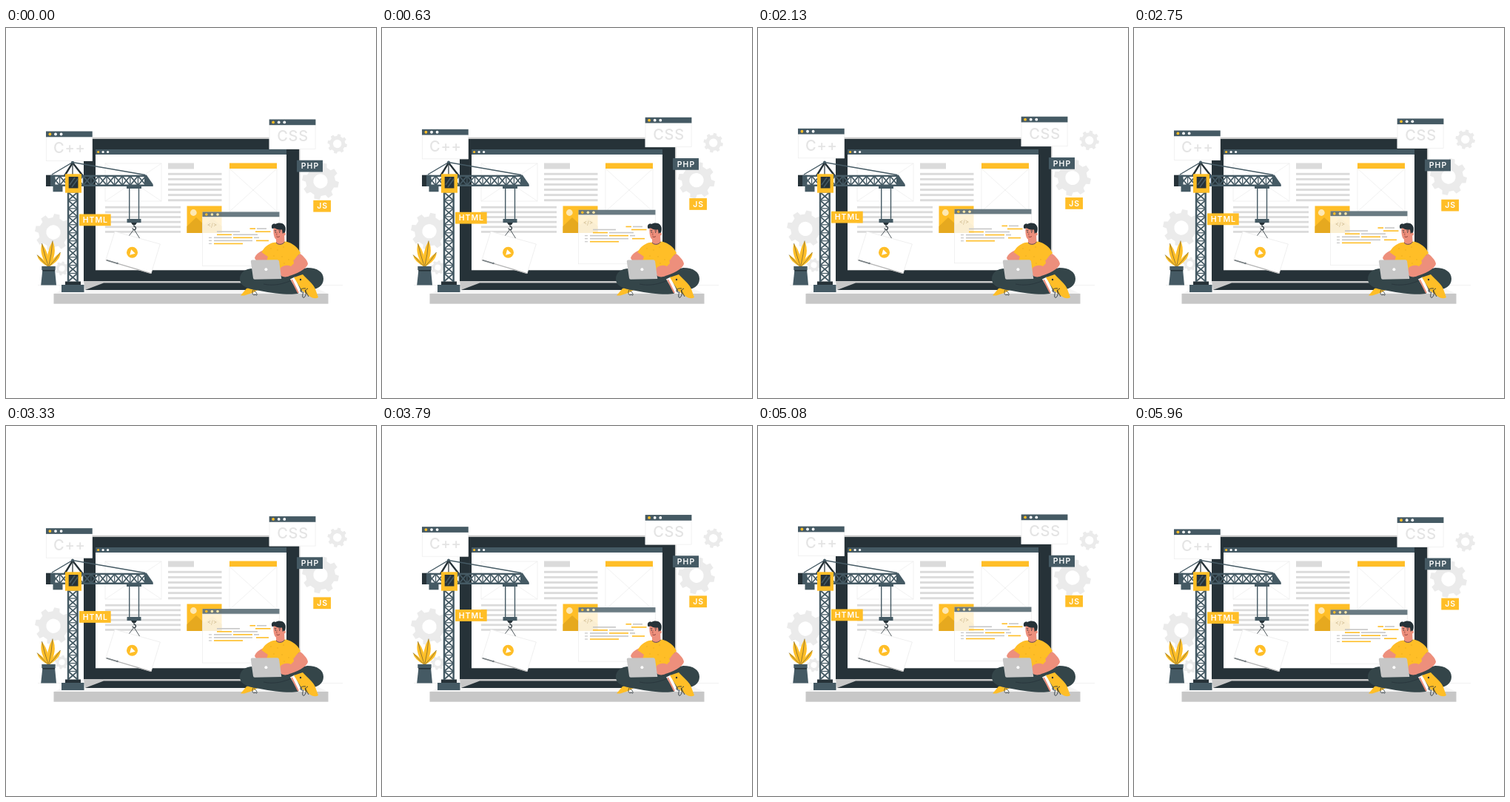
Animation, 500 px wide and 500 px high, one loop 6 s. Source, as an HTML page with a canvas:

```html
<!DOCTYPE html>
<html lang="en">
<head>
<meta charset="utf-8">
<title>Website under construction</title>
<style>
html, body { margin: 0; width: 100%; height: 100%; overflow: hidden; background: #fff; }
canvas { display: block; width: 500px; height: 500px; }
</style>
</head>
<body>
<canvas id="stage"></canvas>
<script>
const canvas = document.getElementById('stage');
const ratio = window.devicePixelRatio || 1;
canvas.width = canvas.height = 500 * ratio;
const ctx = canvas.getContext('2d');

const DARK = '#263238', SLATE = '#455a64', YELLOW = '#ffbe27', GOLD = '#e6a91f';
const PALE = '#ebebeb', LIGHT = '#dbdbdb', GREY = '#c7c7c7', SKIN = '#ed8f7c', PANTS = '#344549';
const LOOP = 6000, LIFT = 6.5;

function rect(color, x1, y1, x2, y2) {
  ctx.fillStyle = color;
  ctx.fillRect(x1, y1, x2 - x1, y2 - y1);
}
function frame(color, x1, y1, x2, y2, w = 0.7) {
  ctx.strokeStyle = color;
  ctx.lineWidth = w;
  ctx.strokeRect(x1, y1, x2 - x1, y2 - y1);
}
function dot(color, x, y, r) {
  ctx.fillStyle = color;
  ctx.beginPath();
  ctx.arc(x, y, r, 0, Math.PI * 2);
  ctx.fill();
}
function trace(pts) {
  ctx.beginPath();
  for (let i = 0; i < pts.length; i += 2) ctx.lineTo(pts[i], pts[i + 1]);
}
function poly(color, ...pts) {
  ctx.fillStyle = color;
  trace(pts);
  ctx.fill();
}
function line(color, w, ...pts) {
  ctx.strokeStyle = color;
  ctx.lineWidth = w;
  trace(pts);
  ctx.stroke();
}
function shape(color, d) {
  ctx.fillStyle = color;
  ctx.fill(new Path2D(d));
}
function curve(color, w, d) {
  ctx.strokeStyle = color;
  ctx.lineWidth = w;
  ctx.stroke(new Path2D(d));
}
function label(text, x, y, size, weight, color, gap) {
  ctx.font = `${weight} ${size}px Inter, sans-serif`;
  ctx.letterSpacing = gap + 'px';
  ctx.textAlign = 'center';
  ctx.textBaseline = 'alphabetic';
  ctx.fillStyle = color;
  ctx.fillText(text, x + gap / 2, y);
}
function crossBox(x1, y1, x2, y2) {
  frame(PALE, x1, y1, x2, y2);
  line(PALE, 0.7, x1, y1, x2, y2);
  line(PALE, 0.7, x1, y2, x2, y1);
}
function dots(x, y, step, r, rest = '#fff') {
  for (let i = 0; i < 3; i++) dot(i ? rest : YELLOW, x + i * step, y, r);
}

function gear(x, y, r, hole) {
  const teeth = 8, step = Math.PI * 2 / teeth;
  ctx.save();
  ctx.translate(x, y);
  ctx.rotate(0.2);
  ctx.beginPath();
  for (let i = 0; i < teeth; i++) {
    const edge = [[-0.3, 0.8], [-0.19, 1], [0.19, 1], [0.3, 0.8]];
    for (const [a, k] of edge) {
      const t = (i + a) * step;
      ctx.lineTo(Math.cos(t) * r * k, Math.sin(t) * r * k);
    }
  }
  ctx.closePath();
  ctx.moveTo(hole, 0);
  ctx.arc(0, 0, hole, 0, Math.PI * 2, true);
  ctx.fillStyle = PALE;
  ctx.fill('evenodd');
  ctx.restore();
}

function laptop() {
  rect(PALE, 43, 347.2, 455, 347.9);
  poly('#f5f5f5', 64.5, 359, 105, 342, 398, 342, 435.5, 359);
  poly(GREY, 105, 342, 397.5, 342, 397.5, 354, 107, 354);
  rect(GREY, 64.5, 359, 435.5, 372.7);
  poly(DARK, 107, 354, 132, 344.5, 370, 344.5, 395, 354);
  rect(GREY, 107, 147.8, 397.5, 342);
  rect(DARK, 105, 150, 396, 342);
  rect('#fff', 121, 164, 379, 327.3);
  rect(SLATE, 121, 164, 379, 171);
  dots(124.6, 167.5, 6.5, 1.6);
}

function page() {
  crossBox(134, 183, 210, 234);
  rect(LIGHT, 219, 182.5, 254, 190.5);
  for (let i = 0; i < 6; i++) {
    rect(LIGHT, 219, 195.8 + i * 7.1, 291.5, 198.7 + i * 7.1);
    rect(LIGHT, 134, 240.8 + i * 6.65, 236, 243.6 + i * 6.65);
  }
  crossBox(302, 190, 366, 248);
  rect(YELLOW, 302, 182.5, 366, 190);
  rect(YELLOW, 244.5, 240.5, 291.5, 277);
  poly(GOLD, 244.5, 277, 244.5, 268, 257, 256, 268, 266, 279, 257, 291.5, 268, 291.5, 277);
  dot('#fde8b3', 253.3, 249.5, 4.4);
}

function codeWindow(dy) {
  ctx.save();
  ctx.translate(0, dy);
  ctx.globalAlpha = 0.8;
  rect('#fff', 265.5, 248.5, 369.5, 321.5);
  rect(SLATE, 265.5, 248.5, 369.5, 255.5);
  ctx.globalAlpha = 1;
  frame(PALE, 265.5, 255.5, 369.5, 321.5);
  dots(270.8, 252, 7.6, 1.8, '#ffe6a8');
  label('</>', 278.5, 269, 7.5, 500, '#d3bf93', 0.2);
  const rows = [
    [329.5, 337, YELLOW, 339, 352, GREY],
    [285, 316, GREY, 337, 357.5, YELLOW],
    [285, 305, YELLOW, 307, 340, GREY],
    [281, 305, GREY, 307, 333, YELLOW, 335, 342, GREY],
    [281, 333, GREY, 338, 355, YELLOW],
    [281, 320, YELLOW]
  ];
  rows.forEach((row, i) => {
    const y = 271.2 + i * 4.05;
    if (i > 2) rect(GREY, 274, y - 0.6, 278, y + 0.6);
    for (let k = 0; k < row.length; k += 3) rect(row[k + 2], row[k], y - 0.8, row[k + 1], y + 0.8);
  });
  ctx.restore();
}

function langWindow(x, y, text) {
  rect('#fff', x, y, x + 62.7, y + 40.3);
  frame(PALE, x + 0.3, y + 0.3, x + 62.4, y + 40);
  rect(SLATE, x, y, x + 62.7, y + 7.7);
  dots(x + 5.4, y + 3.9, 7.6, 1.9);
  label(text, x + 31.4, y + 29.8, 20, 500, '#e4e4e4', 0.7);
}

function tag(color, x, y, w, text) {
  rect(color, x, y, x + w, y + 15.8);
  label(text, x + w / 2, y + 11.7, 10.5, 600, '#fff', 1);
}

function lattice(x, y, w, h, n, upright) {
  const dx = upright ? 0 : w / n, dy = upright ? h / n : 0;
  const cw = upright ? w : dx, ch = upright ? dy : h;
  for (let i = 0; i < n; i++) {
    const a = x + i * dx, b = y + i * dy;
    line(SLATE, 1.8, a, b, a + cw, b + ch);
    line(SLATE, 1.8, a, b + ch, a + cw, b);
    if (upright) line(SLATE, 1.3, a, b, a + cw, b);
    else line(SLATE, 1.3, a, b, a, b + ch);
  }
}

function crane() {
  rect(SLATE, 75, 347, 105.5, 357);
  rect(DARK, 80, 342.5, 101, 347);
  lattice(84, 222, 12.6, 120.5, 11, true);
  rect(SLATE, 82.8, 220, 85.3, 343);
  rect(SLATE, 95.4, 220, 97.9, 343);

  line(SLATE, 1.4, 62, 198, 90, 181.5, 188, 198.5);
  line(DARK, 2.4, 79, 200, 90, 182, 104, 200);
  line(DARK, 1.2, 90, 182, 90, 199);
  dot(SLATE, 90, 181.5, 2);

  lattice(62, 200, 127, 12.5, 12, false);
  rect(SLATE, 60, 198.7, 190, 201);
  rect(SLATE, 60, 211.5, 198.5, 214);
  poly(SLATE, 187, 198.7, 190, 198.7, 198.5, 211, 198.5, 214, 187, 214);
  rect(DARK, 54, 198.7, 60, 214);
  rect(SLATE, 60, 198.7, 66.5, 214);
  rect(SLATE, 63.5, 213, 76.5, 221.3);

  rect(YELLOW, 80, 197.3, 102, 222.7);
  rect(DARK, 84.7, 201, 97.5, 216.5);
  line(SLATE, 1.6, 86, 212, 93, 202);
  line(SLATE, 1.6, 89, 215, 97, 204);

  rect(SLATE, 163, 212.5, 183, 217);
  rect(SLATE, 166, 216, 167.4, 259);
  rect(SLATE, 178.8, 216, 180.2, 259);
  rect(SLATE, 163.5, 258, 182.5, 263);
  poly(DARK, 169, 263, 177, 263, 175, 266, 171, 266);
  curve(DARK, 1.2, 'M173 265 V268 C177 269 175.5 273 173 272.5 C171.5 272.3 171 271.4 171 270.5');
}

function videoCard() {
  poly('#fff', 147, 275, 208.3, 292, 196, 332, 134.7, 314);
  line(PALE, 0.8, 134.7, 314, 147, 275, 208.3, 292, 196, 332);
  line('#b5b5b5', 1.5, 135, 313.6, 196, 331.6);
  line('#777f83', 1.7, 136, 313.8, 150, 318);
  dot('#777f83', 150.5, 318, 1.3);
  line(DARK, 0.8, 166.5, 280.5, 173, 272, 180.5, 284);
  dot(YELLOW, 170.5, 303.3, 7.5);
  poly('#fff', 169.2, 299.3, 174.7, 304.7, 167.2, 306.7);
}

function leaf(x, y, bend, wide) {
  const bx = 57.5, by = 323, mx = (x + bx) / 2 + bend, my = (y + by) / 2;
  shape(YELLOW, `M${bx} ${by} Q${mx - wide} ${my} ${x} ${y} Q${mx + wide} ${my} ${bx} ${by}`);
  curve(DARK, 0.5, `M${bx} ${by} Q${mx} ${my} ${x} ${y}`);
}

function plant() {
  leaf(48.5, 291, -1, 8);
  leaf(63, 287.5, 1.5, 9);
  leaf(42, 306.5, -1, 6);
  leaf(73.5, 303, 2, 7);
  poly(SLATE, 49.5, 326, 66, 326, 68, 347.5, 47.2, 347.5);
  rect(SLATE, 48.3, 322, 66.7, 327);
  rect(DARK, 49.3, 327, 66.2, 328.6);
}

function person() {
  // far arm and torso
  shape(SKIN, 'M350 299 C343 302 337 306 336 311 L340 317 L357 314 L356 302 Z');
  shape(YELLOW, 'M361 290 C354 292 349 296 345.5 303 L354 309 L351 318 L356 333 L389 331 L389 314 L398 304 C394 296 388 291 378 288.5 Z');
  const spots = [[358, 298], [367, 300], [375, 296], [384, 300], [362, 308], [373, 309], [382, 313], [376, 318], [390, 302]];
  for (const [x, y] of spots) dot(GOLD, x, y, 0.7);

  // head
  shape(SKIN, 'M365 283 L376 278 L376.5 289 C374 294 367 294 365 290 Z');
  curve(DARK, 0.7, 'M365 290 C368 293.5 374 293 376.5 289');
  shape(SKIN, 'M361.5 270 C361 278 362 286 367 286.5 C373 286.5 376 280 376.5 271 C374 266 364 265 361.5 270 Z');
  shape(DARK, 'M359.5 271 C357.5 266 361 263.5 364.5 265 C367 262.5 375 263 376.5 267 C379 270 377.5 275 376.5 279 L373.8 278 L373 272.5 C369 273 365 272 363.5 270.5 C362 270 361 271.5 359.5 271 Z');
  dot(SKIN, 376, 278.5, 2);
  dot(DARK, 364.2, 276, 0.7);
  dot(DARK, 369.7, 276, 0.7);
  line(DARK, 0.8, 362.7, 273.8, 365.3, 273.7);
  line(DARK, 0.8, 368.5, 273.8, 371.3, 274.2);
  curve('#9d4a42', 0.6, 'M366.4 276 L365.3 279.5 L367 279.7');
  curve('#7a322e', 0.8, 'M365.5 282 Q368 283.2 370 281.6');

  // crossed legs and shoes
  poly(YELLOW, 317, 361.5, 325, 352, 335, 349, 342, 353, 333, 358, 322, 361.5);
  shape(PANTS, 'M334 325 C323 325 316 331 316 339 C316 349 327 353 343 355 C362 359 384 361 394 359 L403 354 C420 355 429 349 429 339 C429 330 421 324 407 324 L383 330 L352 329 Z');
  curve(DARK, 0.7, 'M348 346 C362 349 374 346 386 341');
  curve(DARK, 0.8, 'M334 354 C331 360 335 362 337 360 C340 364 340 357 335 355');
  poly('#fff', 384, 339.5, 390, 336.5, 399, 356, 396, 359);
  line(SKIN, 2, 386, 340, 395, 358);
  shape(YELLOW, 'M389 337 L401 333 C407 340 416 346 418 353 L422 364 C419 366 415 365.5 411 363 L400 355 Z');
  dot(DARK, 398, 340, 1.2);
  curve(DARK, 0.9, 'M405 352 C396 351 396 358 402 357 C399 363 402 368 405 361 C406 357 402 355 408 352 M404 354 L409 363');

  // near arm and computer
  shape(SKIN, 'M388 312 L397.5 305 C403 309 408 315 408 319 C406 326 393 332 383 335 C377 338 371 336 370 332 L371 324 C376 320 381 320 385 322 L389 318 Z');
  shape(YELLOW, 'M381 297 L397 303 L389 314 L381 309 Z');
  shape(GREY, 'M332.5 313.5 L366.5 313.2 Q368.5 313.2 369 315 L372.3 339 L336 339.8 Q334.3 339.8 334 338 L330.8 315.5 Q330.8 313.5 332.5 313.5 Z');
  dot('#fff', 351.4, 326.3, 2);
}

// linear rise and fall, once per period
function float(t, period) {
  const p = t / period % 1;
  return -LIFT * (1 - Math.abs(1 - 2 * p));
}

function draw(t) {
  const dy = float(t, LOOP / 2);
  const gy = float(t, LOOP);
  ctx.setTransform(ratio, 0, 0, ratio, 0, 0);
  rect('#fff', 0, 0, 500, 500);
  gear(64, 276 + gy, 25, 9.7);
  gear(75.5, 325 + gy, 9.5, 4);
  gear(447.7, 156.5 + gy, 13.3, 5.7);
  gear(425, 207 + gy, 25, 9.7);
  laptop();
  page();
  codeWindow(dy);
  person();
  crane();
  videoCard();
  plant();
  langWindow(54, 139.6 + dy, 'C++');
  langWindow(355.7, 123.5 + dy, 'CSS');
  tag(SLATE, 393, 178.7 + dy, 35, 'PHP');
  tag(YELLOW, 99, 251.5 + dy, 42.7, 'HTML');
  tag(YELLOW, 415.3, 232.8 + dy, 23.7, 'JS');
}

function tick(now) {
  draw(now % LOOP);
  requestAnimationFrame(tick);
}
draw(0);
requestAnimationFrame(tick);
</script>
</body>
</html>
```
